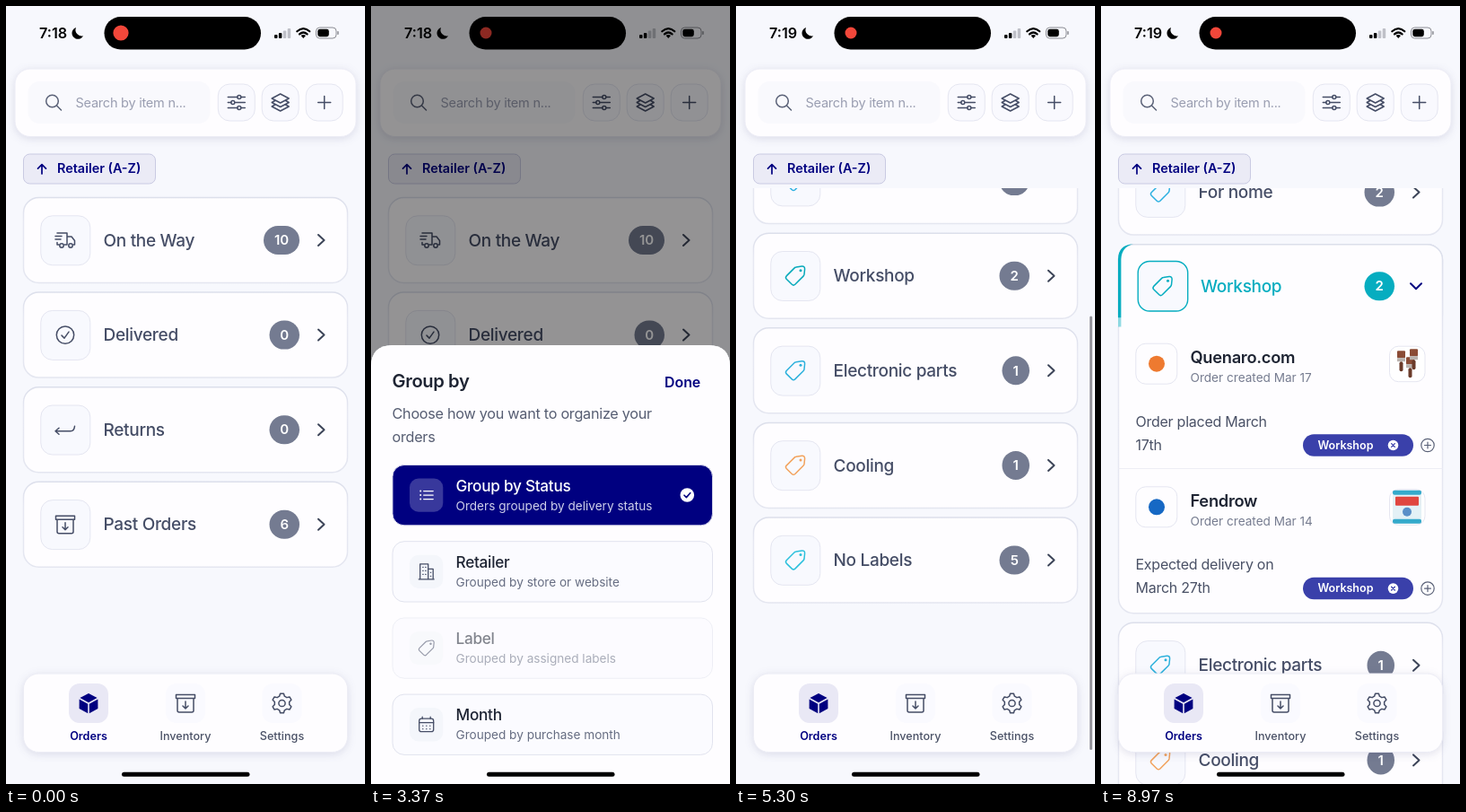
An HTML page for the animation above (9 s loop, 400 by 867 pixels).

```html
<!DOCTYPE html>
<html lang="en">
<head>
<meta charset="utf-8">
<title>Orders</title>
<style>
html, body { margin: 0; width: 100%; height: 100%; overflow: hidden; background: #f7f8fd; }
svg { display: block; font-family: Inter, Roboto, sans-serif; }
.lift { filter: drop-shadow(0 2px 5px rgba(40, 40, 100, .13)); }
</style>
</head>
<body>
<svg id="stage" width="400" height="867" viewBox="0 0 400 867"></svg>
<script>
const NAVY = '#000080', INK = '#454d66', DARK = '#1e2433', EDGE = '#e5e6f1', TEAL = '#06adc0', WHITE = '#fefdff';

// Drawing helpers, each returning SVG markup
const text = (x, y, size, weight, fill, str, extra = '') =>
  `<text x="${x}" y="${y}" font-size="${size}" font-weight="${weight}" fill="${fill}" ${extra}>${str}</text>`;
const rect = (x, y, w, h, r, fill, stroke = 'none', extra = '') =>
  `<rect x="${x}" y="${y}" width="${w}" height="${h}" rx="${r}" fill="${fill}" stroke="${stroke}" ${extra}/>`;
const line = (d, stroke = INK, width = 1.5, fill = 'none') =>
  `<path d="${d}" fill="${fill}" stroke="${stroke}" stroke-width="${width}" stroke-linecap="round" stroke-linejoin="round"/>`;
const fillPath = (d, fill) => `<path d="${d}" fill="${fill}"/>`;
const dot = (x, y, r, fill, stroke = 'none', width = 1.5) =>
  `<circle cx="${x}" cy="${y}" r="${r}" fill="${fill}" stroke="${stroke}" stroke-width="${width}"/>`;
const at = (x, y, body, extra = '') => `<g transform="translate(${x} ${y})" ${extra}>${body}</g>`;
const tight = 'letter-spacing="-.016em"';
const mid = 'text-anchor="middle"';

const gearPath = () => {
  const pts = [];
  for (let k = 0; k < 6; k++)
    for (const [turn, r] of [[-20, 8.3], [-10, 11], [10, 11], [20, 8.3]]) {
      const a = (k * 60 + turn - 90) * Math.PI / 180;
      pts.push((r * Math.cos(a)).toFixed(2) + ' ' + (r * Math.sin(a)).toFixed(2));
    }
  return 'M' + pts.join('L') + 'Z';
};

// Icons, centred on 0,0
const icon = {
  truck: line('M-9-8H2V5H-1M2-4H7L10.5 .5V5H9M-7 5H-9V2.5M-11-4.5H-4M-11-1H-5') + dot(-4, 6, 2.2, 'none', INK) + dot(6, 6, 2.2, 'none', INK),
  check: dot(0, 0, 9.7, 'none', INK) + line('M-4 .5-1 3.5 4-3.5'),
  back: line('M-7-2-11 1.5-7 5M-11 1.5H6Q10 1.5 10.5-4'),
  archive: line('M-10.5-9.5H10.5V-5.5H-10.5ZM-9-5.5V8Q-9 10-7 10H7Q9 10 9 8V-5.5M0-2V6M-3 3 0 6 3 3'),
  tag: color => line('M1-9.6 7.5-10.6Q10.7-10.8 10.6-7.5L10-1.5Q9.8-.4 9 .4L-.2 9.6Q-2 11.2-3.7 9.6L-9.8 3.6Q-11.3 1.8-9.8 .2L-.8-8.8Q0-9.5 1-9.6Z', color) + dot(6, -6, 1.5, color),
  cube: fillPath('M0-11 9.6-6 0-.8-9.6-6Z', NAVY) + fillPath('M-10.4-4.4-.8 .8V11.2L-10.4 6Z', NAVY) + fillPath('M10.4-4.4 .8 .8V11.2L10.4 6Z', NAVY),
  gear: line(gearPath()) + dot(0, 0, 3.6, 'none', INK),
  sliders: line('M-9.5-6H1M5-6H9.5M-9.5 0H-6M-2 0H9.5M-9.5 6H1M5 6H9.5') + dot(3, -6, 2, 'none', INK) + dot(-4, 0, 2, 'none', INK) + dot(3, 6, 2, 'none', INK),
  layers: line('M0-9.5 9.5-4.5 0 .5-9.5-4.5ZM-6-2 -9.5 0 0 5 9.5 0 6-2M-6 2.5-9.5 4.5 0 9.5 9.5 4.5 6 2.5'),
  plus: line('M-7 0H7M0-7V7'),
  bullets: [-4.5, 0, 4.5].map(y => dot(-6.5, y, 1, '#fff') + line(`M-3 ${y}H7.5`, '#fff', 1.4)).join(''),
  building: line('M-8.5 8.5H8.5M-7 8.5V-8.5H2V8.5M2-3H7.5V8.5M-4-5H-3.5M-1-5H-.5M-4-1H-3.5M-1-1H-.5M-4 3H-3.5M-1 3H-.5M4.7 1H5M4.7 5H5', INK, 1.3),
  calendar: rect(-8, -6.5, 16, 14.5, 2.5, 'none', INK, 'stroke-width="1.3"') + line('M-8-2H8M-4.5-8.5V-6.5M4.5-8.5V-6.5M-4 1.5H-3.8M0 1.5H.2M4 1.5H4.2M-4 5H-3.8M0 5H.2M4 5H4.2', INK, 1.3)
};

const badge = (y, n, color = '#747b91') => {
  const w = n > 9 ? 40 : n == 1 ? 30.5 : 33.5;
  return rect(327 - w, y - 16, w, 32, 16, color) + text(327 - w / 2, y + 5.3, 15, 600, '#fff', n, mid);
};

const cardBox = (h, extra = '') => rect(19.5, .5, 361, h, 17, WHITE, 'url(#edge)', 'stroke-width="1.5" ' + extra);
const card = (title, n, art) => cardBox(95) +
  rect(38.8, 20.8, 55, 55, 13, '#f8f9fe', EDGE) + at(66, 48, art) +
  text(108.5, 54.7, 19, 500, INK, title, tight) + badge(48, n) + line('M348 42 354.5 48 348 54', '#3d4559', 2);

const PITCH = 105.6, TOP = 213, GROWTH = 316;
const stack = cards => cards.map((c, i) => at(0, TOP + PITCH * i, card(...c))).join('');

const statusList = stack([
  ['On the Way', 10, icon.truck], ['Delivered', 0, icon.check],
  ['Returns', 0, icon.back], ['Past Orders', 6, icon.archive]
]);
const upper = stack([
  ['Garden', 2, icon.tag('#2bb0e0')], ['For home', 2, icon.tag('#2bb0e0')], ['Workshop', 2, icon.tag('#06a9ba')]
]);
const lower = at(0, PITCH * 3, stack([
  ['Electronic parts', 1, icon.tag('#2db1dc')], ['Cooling', 1, icon.tag('#f2a25c')], ['No Labels', 5, icon.tag('#2cc0dc')]
]));

const order = (y, shop, logo, day, note1, note2, photo) => at(0, y,
  rect(38.8, 0, 46, 45, 11, WHITE, EDGE) + dot(62, 22.5, 9, logo) +
  text(99.5, 22, 18.3, 600, DARK, shop, tight) + text(99.5, 43, 13.6, 400, '#767c90', 'Order created Mar ' + day) +
  rect(321.5, 3, 39.5, 39.5, 10, '#fff', EDGE) + photo +
  text(38.5, 92.5, 16, 400, '#4a5166', note1, tight) + text(38.5, 118.5, 16, 400, '#4a5166', note2, tight) +
  rect(225, 101, 123, 24.5, 12.2, '#3a40aa') + text(241.5, 117.7, 12.5, 600, '#fff', 'Workshop') +
  dot(325.5, 113.3, 5.8, '#fff') + line('M323.6 111.4 327.4 115.2M327.4 111.4 323.6 115.2', '#3a40aa', 1.3) +
  dot(364, 113.3, 7.2, 'none', '#5b6278', 1.2) + line('M360.5 113.3H367.5M364 109.8V116.8', '#5b6278', 1.2));

const brushes = [[330, 8], [340, 15], [344, 6]].map(([x, y]) =>
  rect(x, y, 9, 8, 1, '#8a4b35') + rect(x, y + 8, 9, 4, 0, '#b9b2ae') + rect(x + 2.5, y + 12, 4, 11, 2, '#6b3b2a')).join('');
const bag = rect(325, 4, 32, 37, 5, '#e4f1f6') + rect(325, 4, 32, 5, 2, '#35aacb') +
  rect(328, 11, 26, 10, 1, '#e0463f') + dot(341, 28, 5, '#5a8fc8') + rect(325, 36, 32, 5, 2, '#35aacb');

const openCard = cardBox(95, 'id="openBox"') +
  `<g clip-path="url(#openClip)">` +
  fillPath('M19 92V17Q19 1 36 0Q23 3 22.4 17V92Z', TEAL) + rect(18, 82, 5, 10, 0, WHITE, 'none', 'opacity=".55"') +
  rect(41.2, 19.3, 55.5, 55.5, 13, '#f8f9fe', TEAL, 'stroke-width="1.4"') + at(68.5, 47, icon.tag(TEAL)) +
  text(111, 53.7, 19, 500, TEAL, 'Workshop', tight) + badge(47, 2, TEAL) + line('M345 44 351 50 357 44', NAVY, 2) +
  order(111, 'Quenaro.com', '#ee7a30', 17, 'Order placed March', '17th', brushes) +
  line('M20 250.3H380', '#ededf5', 1) +
  order(270.6, 'Fendrow', '#1668c4', 14, 'Expected delivery on', 'March 27th', bag) + '</g>';

const options = [
  ['Group by Status', 'Orders grouped by delivery status', icon.bullets],
  ['Retailer', 'Grouped by store or website', icon.building],
  ['Label', 'Grouped by assigned labels', at(0, 0, icon.tag(INK), 'class="small"')],
  ['Month', 'Grouped by purchase month', icon.calendar]
];
const option = ([title, sub, art], i, chosen) => {
  const on = i == chosen;
  return at(0, 511.5 + 85.2 * i,
    rect(24, 0, 356.5, 67.3, 13, on ? NAVY : '#fbfbff', on ? '#d5d5ea' : '#e1e3ee') +
    rect(43, 15, 37.3, 37.3, 10, on ? 'rgba(255,255,255,.22)' : '#f4f6fb') +
    at(61.7, 33.6, `<g transform="scale(${i == 2 ? .8 : 1})">${art}</g>`) +
    text(94.5, 29.3, 17.2, 500, on ? '#fff' : DARK, title, tight) +
    text(94.5, 50, 13.6, 400, on ? '#cfd0ea' : '#666d82', sub) +
    (on ? dot(352.3, 33.5, 7.8, '#fff') + line('M349 33.7 351.4 36.1 355.7 31.2', NAVY, 1.6) : ''),
    i == 2 && !on ? 'id="labelRow"' : '');
};
const optionSet = chosen => options.map((o, i) => option(o, i, chosen)).join('');

const sheetShape = 'M0 867V402Q0 378 24 378H376Q400 378 400 402V867Z';
const sheet = `<path d="M0 0H400V867H0Z${sheetShape}" fill="#000" fill-opacity=".42" fill-rule="evenodd"/>` +
  fillPath(sheetShape, WHITE) +
  text(23.5, 425, 20.2, 600, DARK, 'Group by', 'letter-spacing="-.02em"') + text(327, 425.3, 15.9, 600, NAVY, 'Done') +
  text(23.5, 460, 16.2, 400, '#565d72', 'Choose how you want to organize your', tight) +
  text(23.5, 485.5, 16.2, 400, '#565d72', 'orders', tight) +
  `<g id="before">${optionSet(0)}</g><g id="after">${optionSet(2)}</g>`;

const statusBar = text(37, 36, 16.2, 600, '#000', '7:18', 'id="clock"') +
  fillPath('M78 24A6.6 6.6 0 1 0 86 33.2A6.8 6.8 0 0 1 78 24Z', '#000') +
  rect(109.5, 12, 174.5, 36.5, 18.2, '#000') + `<circle id="rec" cx="128" cy="30" fill="#f2473a"/>` +
  [4, 6, 8.5, 11].map((h, i) => rect(299 + 4.9 * i, 36 - h, 3.5, h, 1, i < 2 ? '#000' : '#bfc0c8')).join('') +
  line('M324.3 28.3Q331.3 21.8 338.3 28.3M327 31.4Q331.3 27.6 335.6 31.4', '#000', 2.2) + fillPath('M328.6 33Q331.3 30.9 334 33L331.3 36Z', '#000') +
  rect(345.5, 24, 22.5, 12, 4, 'none', '#8c8d94') + rect(347.3, 25.8, 12.5, 8.4, 2.4, '#000') + rect(369.2, 28, 1.5, 4, .7, '#8c8d94');

const tool = (x, art, extra = '') => `<g ${extra}>` + rect(x, 87, 41, 41, 13, '#f9f9fe', EDGE) + at(x + 20.5, 107.5, art) + '</g>';
const searchBar = rect(10, 70, 380, 75.5, 17, WHITE, '#ececf5', 'class="lift"') +
  rect(24.5, 84, 203, 47, 13, '#f9f9fd') + dot(51.5, 106, 6.8, 'none', '#5b6278') + line('M56.5 111 61.5 116', '#5b6278') +
  text(77.5, 112.7, 14.5, 400, '#9a9eb1', 'Search by item n...', tight) +
  tool(236.3, icon.sliders) + tool(285.2, icon.layers, 'id="groupBtn"') + tool(334.2, icon.plus) +
  rect(19.5, 165, 147, 33, 7, '#ebebf6', '#c9cae2') + line('M40 187V177M35.5 181.2 40 176.7 44.5 181.2', NAVY, 1.7) +
  text(57, 186.3, 14.4, 600, NAVY, 'Retailer (A-Z)');

const tab = (x, label, art, on) => rect(x - 22, 755, 44, 44, 12, on ? '#e9e8f5' : '#fafaff') + at(x, 777, art) +
  text(x, 817.5, 12.6, on ? 600 : 500, on ? NAVY : '#4a5166', label, mid);
const tabs = rect(19.5, 744, 361, 87.5, 17, WHITE, '#ececf5', 'class="lift"') +
  tab(92, 'Orders', icon.cube, true) + tab(200, 'Inventory', icon.archive) + tab(307.5, 'Settings', icon.gear);

const stage = document.getElementById('stage');
stage.innerHTML = `<defs>
  <linearGradient id="edge" x2="0" y2="1"><stop stop-color="#dcdfeb"/><stop offset=".3" stop-color="#e7e8f2"/><stop offset="1" stop-color="#e4e6f0"/></linearGradient>
  <clipPath id="listClip"><rect y="203" width="400" height="664"/></clipPath>
  <clipPath id="openClip"><rect id="openMask" x="18" width="364" height="95"/></clipPath></defs>` +
  rect(0, 0, 400, 867, 0, '#f7f8fd') +
  `<g clip-path="url(#listClip)"><g id="byStatus">${statusList}</g>
   <g id="byLabel">${upper}<g id="lower">${lower}</g>${at(0, TOP + PITCH * 2, openCard, 'id="open"')}</g></g>` +
  searchBar + tabs + rect(394, 206, 3, 497, 1.5, '#97979e', 'none', 'id="bar"') + statusBar +
  `<g id="sheet">${sheet}</g>` +
  `<g id="overlay"></g>` + rect(129, 853.7, 142.5, 5, 2.5, '#000');

const el = id => document.getElementById(id);
const set = (id, attrs) => { for (const k in attrs) el(id).setAttribute(k, attrs[k]); };
const show = (id, on) => set(id, { display: on ? 'inline' : 'none' });

function draw(now) {
  const t = now % 9000;
  const ease = (a, b) => {
    const u = Math.min(1, Math.max(0, (t - a) / (b - a)));
    return u * u * (3 - 2 * u);
  };
  const grouped = t >= 3450;

  el('clock').textContent = t < 4100 ? '7:18' : '7:19';
  set('rec', { r: 8.6 - 2.1 * ease(0, 400) });
  set('groupBtn', { opacity: 1 - .45 * (ease(1020, 1120) - ease(1220, 1420)) });
  set('labelRow', { opacity: 1 - .45 * ease(3230, 3330) });
  set('sheet', { opacity: ease(1100, 1370) - ease(3450, 3720) });
  show('before', !grouped);
  show('after', grouped);
  show('byStatus', !grouped);
  show('byLabel', grouped);

  // Pull past the end, then settle back
  const end = 159, scroll = 172 * ease(4715, 5320) - 13 * ease(5950, 6450);
  const over = Math.max(0, scroll - end) * 1.07;
  set('byLabel', { transform: `translate(0 ${-scroll})` });
  set('bar', {
    y: 332 - Math.max(0, end - scroll) * .79 + over,
    height: 497 - over,
    opacity: ease(4700, 4800) - ease(7500, 7750)
  });

  const grow = GROWTH * ease(7450, 7800);
  set('open', { opacity: ease(7430, 7580) });
  set('openBox', { height: 95 + grow });
  set('openMask', { height: 95 + grow });
  set('lower', { transform: `translate(0 ${grow})` });
  requestAnimationFrame(() => draw(performance.now()));
}
draw(performance.now());
</script>
</body>
</html>
```
